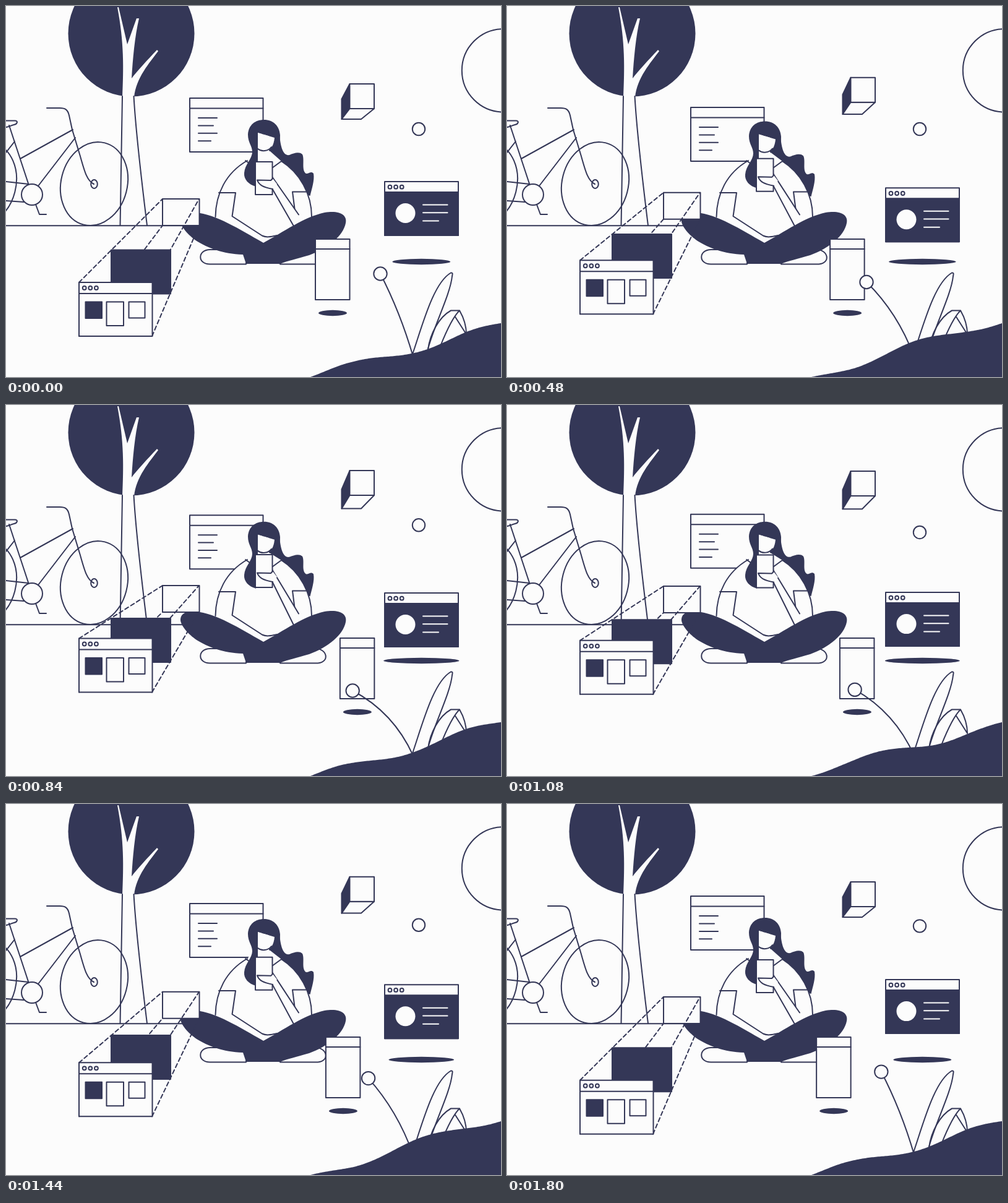
These frames come from a looping animation (800x600 px, 1.83 s). An HTML page with a canvas:

```html
<!DOCTYPE html>
<html lang="en">
<head>
<meta charset="utf-8">
<title>Designing outdoors</title>
<style>
html, body { margin: 0; width: 100%; height: 100%; overflow: hidden; background: #fcfcfc; }
canvas { display: block; width: 800px; height: 600px; }
</style>
</head>
<body>
<canvas id="stage" width="800" height="600"></canvas>
<script>
const ctx = document.getElementById('stage').getContext('2d');
const INK = '#343757', PAPER = '#fcfcfc';
const LOOP = 1830, STEP = 30;

const ease = x => { x = Math.min(1, Math.max(0, x)); return x * x * (3 - 2 * x); };

function shape(d, fill, stroke = INK) {
  const path = new Path2D(d);
  if (fill) { ctx.fillStyle = fill; ctx.fill(path); }
  if (stroke) { ctx.strokeStyle = stroke; ctx.stroke(path); }
}
function rect(x, y, w, h, fill) {
  shape(`M${x},${y}h${w}v${h}h${-w}Z`, fill);
}
function oval(x, y, rx, ry, fill, stroke = INK, turn = 0) {
  ctx.beginPath();
  ctx.ellipse(x, y, rx, ry, turn, 0, Math.PI * 2);
  if (fill) { ctx.fillStyle = fill; ctx.fill(); }
  if (stroke) { ctx.strokeStyle = stroke; ctx.stroke(); }
}
const dots = (x, y) => [0, 9.6, 19.2].forEach(dx => oval(x + dx, y, 2.9, 2.9));
function shifted(dx, dy, draw) {
  ctx.save();
  ctx.translate(dx, dy);
  draw();
  ctx.restore();
}

function bike() {
  oval(142.5, 287.5, 53.5, 68.3, null, INK, 0.253);
  oval(-37.5, 287.5, 53.5, 68.3, null, INK, 0.253);
  oval(142.5, 288, 5.3, 7, null);
  shape('M66,165H87C96,165 100,168 102,177L107,200L120,243C127,268 131,283 142,288');
  shape('M108,200L23,247M112,213L52,291M5,193L37,290M14,219L0,237M0,284L36,288M0,315L29,317');
  shape('M0,185.5H15C20,186 18,191 13,192C8,193 6,195 0,196');
  oval(42, 305, 17, 17, PAPER);
  shape('M48,321L54,337H65');
}

function tree() {
  oval(202.5, 44.5, 102, 102, INK, null);
  shape('M180,2L182,2L196,62L211,20L215,20C208,50 205,85 203,117C212,105 228,88 244,71L246,73C232,92 210,116 207,148L228,355H184.5L188,148C190,100 191,60 180,2Z', PAPER, null);
  shape('M188,146L184.5,355M206.5,146C209,190 220,290 228,355');
}

function notes(y) {
  rect(297, y, 118.5, 87, PAPER);
  shape(`M297,${y + 16.5}h118.5`);
  [30, 24, 30, 20].forEach((w, i) => shape(`M311,${y + 32 + i * 12.4}h${w}`));
}

function cube(p) {
  const top = 126 - 20.5 * p, bot = top + 40;
  const low = 183 - 16 * p, side = 150.5 - 14.5 * p;
  shape(`M555.5,${top}L555.5,${bot}L542.5,${low}V${side}Z`, INK);
  shape(`M555.5,${bot}H595L574,${low}H542.5Z`, PAPER);
  rect(555.5, top, 39.5, 40, PAPER);
}

function woman(p) {
  const nod = 5 * p, sag = 2.5 * p, lift = -10.3 * p;
  // hair behind the shoulder
  shape(`M425,${200 + nod}L442,${205 + nod}C443,${225 + nod} 447,${243 + nod} 458,${241 + nod}C465,${238 + nod} 474,${235 + nod} 479,${240 + nod}C483,${248 + nod} 477,${266 + sag} 485,${271 + sag}C489,${272 + sag} 493,${266 + sag} 497,${271 + sag}C499,${282 + sag} 494,${296 + sag} 491.5,${307 + sag}L470,300L425,245Z`, INK, null);
  // torso and arms
  shape(`M338.5,341C339,304 355,270 390,250L407,${228 + nod}L427,${235 + nod}L445,251C475,270 494,304 494,341L450,395H380Z`, PAPER, null);
  shape('M338.5,341C339,304 355,270 390,250M445,251C475,270 494,304 494,341M445,251L430,262M387,250L394,255');
  shape('M344,302H371L365.5,340L414,371.5C421,375 429,373 438,371M488,300.5H463L466.5,328');
  shape(`M430,${277 + lift}L473,337L465,356L430,${296 + lift}Z`, PAPER, null);
  shape(`M430,${276 + lift}L473,337.5M430,${295 + lift}L465,356`);
  // head
  shifted(0, nod, () => {
    shape('M407,205V252H404V292C392,289 384,280 385,270C386,256 398,247 398,236C398,226 391,221 391,208C392,192 403,184 417,184C432,184 442,194 443,209L442,232L434,228V213Z', INK, null);
    shape('M407,205L434,213C433,225 428,234 419,234C413,234 409,232 407,230Z', PAPER, null);
    shape('M407,231C413,236 424,235 429,228');
  });
  // handset and fingers
  shifted(0, lift, () => {
    rect(403, 252, 27.5, 53, PAPER);
    shape('M431,279L428,282L406,281.5C409,290 416,293 431,296L438,288Z', PAPER, null);
    shape('M431,279L428,282L406,281.5C409,290 416,293 431,296');
  });
  // feet, then legs
  shape('M388,417.5H330C309,418 309,394 330,394H388ZM443,417.5H504C523,416 521,394 497,393H450Z', PAPER);
  shape('M282,346C283,336 294,333 306,334C340,337 377,361 416,383C449,365 482,341 515,334C538,330 552,337 549,351C545,372 520,392 490,403C470,409 455,412 443,417H388L383,402C350,401 326,391 308,380C295,371 281,356 282,346Z', INK, null);
}

function layers(p) {
  const front = 447 - 71.5 * p, mid = 394.5 - 51 * p, back = 312 - 20.6 * p;
  rect(253, back, 59.5, 43, PAPER);
  ctx.setLineDash([6.5, 4.5]);
  shape(`M118,${front}L253,${back}M236,${front}L312,${back}M118,${front + 87}L253,${back + 43}M236,${front + 87}L312,${back + 43}`);
  ctx.setLineDash([]);
  rect(170, mid, 96, 71, INK);
  rect(118, front, 118.5, 87, PAPER);
  shape(`M118,${front + 18}h118.5`);
  dots(126.7, front + 9);
  rect(128.5, front + 31.5, 26.5, 26.5, INK);
  rect(162.5, front + 31.5, 27.5, 38.5);
  rect(198.5, front + 31.5, 26, 26);
}

function handset(x) {
  rect(x, 377, 55.5, 98, PAPER);
  shape(`M${x},393h55.5`);
  oval(x + 28, 496.5, 23, 4.7, INK, null);
}

function profile(p) {
  const y = 284 + 20.6 * p;
  rect(612, y, 119, 87, PAPER);
  rect(612, y + 17, 119, 70, INK);
  dots(620.5, y + 8.7);
  oval(645.5, y + 51, 16, 16, PAPER, null);
  shape(`M674,${y + 37.5}h39.5M674,${y + 50.3}h39.5M674,${y + 63.5}h25`, null, PAPER);
  oval(671.3, 413.5, 47 + 14.5 * p, 4.7, INK, null);
}

function plants(p) {
  shape('M656,566C672,520 690,448 719,431.5C722,431 722,433 721,437C718,467 691,518 681,558');
  shape('M682,556C685,530 700,503 719,492.5H733C739,503 744,515 744,531L725.5,502M733,492.5C722,503 710,530 702,550');
  const x = 605 - 50 * p + 4 * p * p, y = 433 + 24 * p + 6 * p * p;
  shape(`M${x},${y}Q${637 - 11 * p},${495 + 2 * p} 658,567`);
  oval(x, y, 10.7, 10.7, PAPER);
}

// resting height of the hill, as x, y knots
const KNOTS = [[492, 600], [540, 586], [560, 581], [600, 569], [650, 554], [700, 540], [745, 526.5], [800, 513]];
function restY(x) {
  let i = 0;
  while (i < KNOTS.length - 2 && x > KNOTS[i + 1][0]) i++;
  const [x0, y0] = KNOTS[i], [x1, y1] = KNOTS[i + 1];
  return y0 + (y1 - y0) * (x - x0) / (x1 - x0);
}
function hill(ms) {
  ctx.beginPath();
  ctx.moveTo(492, 602);
  for (let x = 492; x <= 800; x += 2) {
    const swell = 10.5 * Math.sin(Math.PI * (x - 492) / 308);
    const phase = ms / 900 - 0.1 - (x - 560) * 0.0035;
    // averaging softens the knots
    const rest = (restY(x - 12) + 2 * restY(x) + restY(x + 12)) / 4;
    ctx.lineTo(x, rest - swell * Math.cos(2 * Math.PI * phase));
  }
  ctx.lineTo(802, 602);
  ctx.fillStyle = INK;
  ctx.fill();
}

function draw(t) {
  const ms = Math.max(0, Math.floor((t + 1) / STEP) * STEP - 30);
  const p = ms < 900 ? ease(ms / 900) : 1 - ease((ms - 900) / 900);
  const slide = ms < 900 ? ease(ms / 840) : 1 - ease((ms - 930) / 870);
  ctx.fillStyle = PAPER;
  ctx.fillRect(0, 0, 800, 600);
  ctx.lineWidth = 2;
  ctx.lineJoin = ctx.lineCap = 'round';

  oval(804, 104.3, 67.2, 67.2);
  tree();
  shape('M0,355.3H300');
  bike();
  notes(149 + 30 * p);
  cube(p);
  oval(667, 199 + 8 * Math.sin(2 * Math.PI * ms / 900), 10.2, 10.2);
  woman(p);
  layers(p);
  handset(500 + 40 * slide);
  profile(p);
  plants(p);
  hill(ms);
}

let start = null;
function tick(now) {
  if (start === null) start = now;
  draw((now - start) % LOOP);
  requestAnimationFrame(tick);
}
draw(0);
requestAnimationFrame(tick);
</script>
</body>
</html>
```
